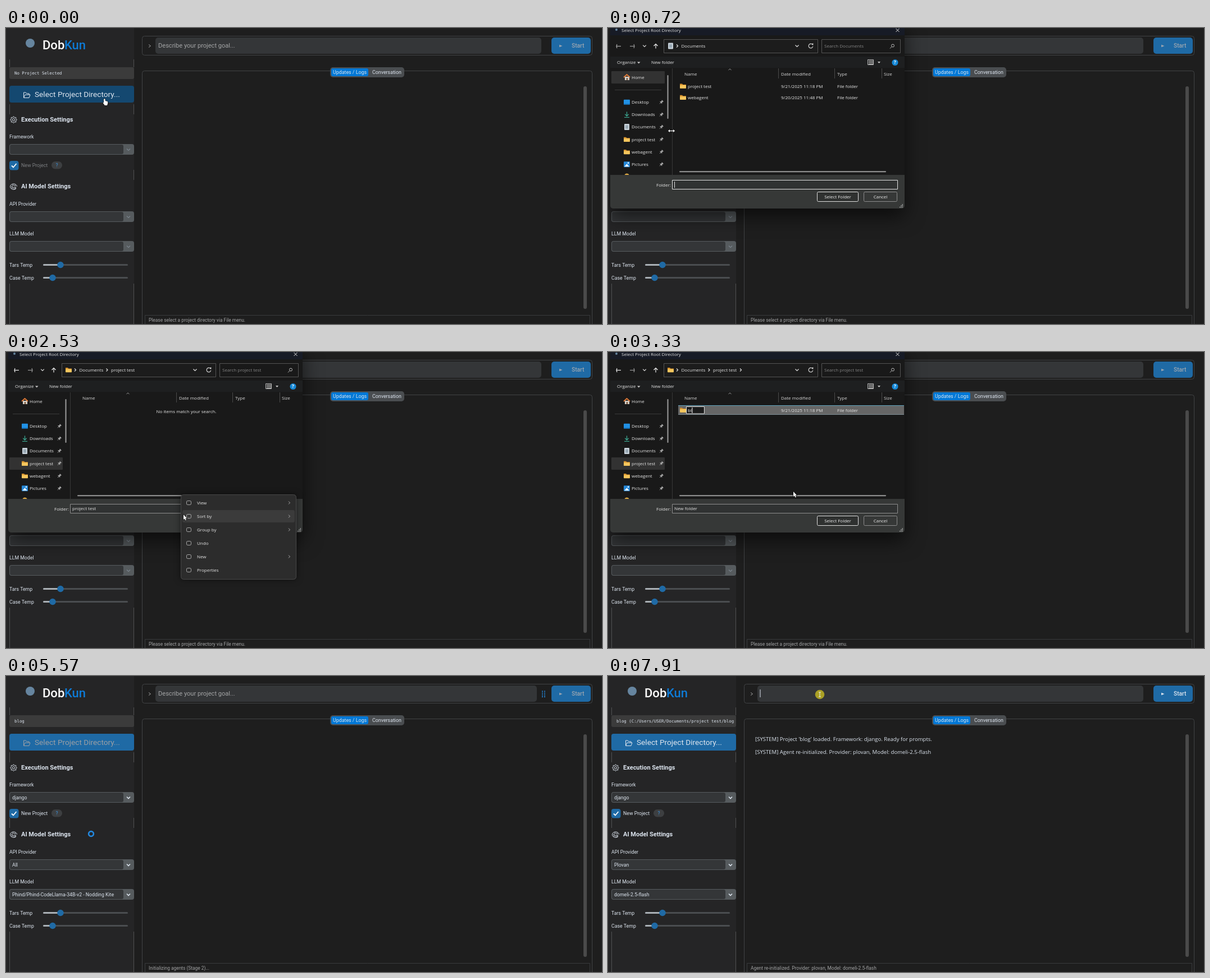
Write an HTML page with a canvas that moves like this. It is 1061 px wide and 528 px high and loops after 8 s.

```html
<!DOCTYPE html>
<html lang="en">
<head>
<meta charset="utf-8">
<title>Project setup</title>
<style>
html, body { margin: 0; width: 100%; height: 100%; overflow: hidden; background: #1e1e1e; }
canvas { display: block; }
</style>
</head>
<body>
<canvas id="stage" width="1061" height="528"></canvas>
<script>
const ctx = document.getElementById('stage').getContext('2d');
const LOOP = 8000;
const UI = 'Roboto, sans-serif', SYS = '"Open Sans", sans-serif', MONO = '"DejaVu Sans Mono", monospace';
const BLUE = '#1f6aa5', LIGHT = '#dce4ee', GREY = '#9a9a9a', YELLOW = '#e0ab45';
const MODELS = ['1.0-pro', '1.5-flash', '1.5-pro', '2.5-flash', '2.5-pro'].map(v => 'domeli-' + v);
const PROVIDERS = ['All', 'Nodding Kite', 'Plovan'];

// time, x, y, shape, click halo
const POINTER = [
  [0, 174, 126, 'hand'], [200, 0, 0, ''], [720, 113, 183.5, 'resize'],
  [860, 108, 188, 'resize'], [960, 92, 194, 'arrow'], [1060, 76, 199, 'arrow'],
  [1160, 72, 201, 'arrow', 1], [1270, 72, 201, 'arrow'], [1470, 90, 196, 'arrow'],
  [1570, 140, 184, 'arrow'], [1670, 208, 155.5, 'arrow'], [1820, 310, 254, 'arrow'],
  [2430, 316, 290, 'arrow'], [2540, 328, 330, 'arrow'], [2650, 345, 349, 'arrow'],
  [2750, 430, 349, 'arrow', 1], [2860, 484, 238, 'arrow'], [3080, 400, 244, 'arrow'],
  [3130, 330, 249, 'arrow'], [4180, 343, 262, 'arrow'], [4280, 372, 282, 'arrow'],
  [4380, 398, 296, 'arrow'], [4480, 409, 301, 'arrow'], [4580, 409, 301, 'arrow', 1],
  [4680, 409, 301, 'arrow'], [4980, 0, 0, ''], [5950, 250, 345, 'arrow'],
  [6040, 220, 335, 'arrow', 1], [6140, 215, 342, 'arrow'], [6230, 110, 372, 'arrow'],
  [6330, 62, 386, 'arrow'], [6430, 60, 387, 'arrow', 1], [6520, 120, 384, 'arrow'],
  [6620, 195, 382, 'arrow'], [6710, 220, 384.5, 'arrow', 1], [6910, 170, 415, 'arrow'],
  [7010, 84, 458, 'arrow'], [7120, 77, 457, 'arrow', 1], [7220, 76, 455, 'arrow'],
  [7420, 142, 402, 'arrow'], [7660, 230, 270, 'arrow'], [7740, 345, 90, 'arrow'],
  [7830, 377, 33, 'beam'], [7910, 377, 33, 'beam', 1]
];

function fill(x, y, w, h, color, r = 0) {
  ctx.fillStyle = color;
  ctx.beginPath();
  ctx.roundRect(x, y, w, h, r);
  ctx.fill();
}
function frame(x, y, w, h, color, r = 0) {
  ctx.strokeStyle = color;
  ctx.lineWidth = 1;
  ctx.beginPath();
  ctx.roundRect(x + .5, y + .5, w - 1, h - 1, r);
  ctx.stroke();
}
function path(points, color, width = 1, close = false) {
  ctx.beginPath();
  for (let i = 0; i < points.length; i += 2) ctx.lineTo(points[i], points[i + 1]);
  if (close) ctx.closePath();
  ctx.strokeStyle = color;
  ctx.lineWidth = width;
  ctx.stroke();
}
function poly(points, color) {
  ctx.beginPath();
  for (let i = 0; i < points.length; i += 2) ctx.lineTo(points[i], points[i + 1]);
  ctx.fillStyle = color;
  ctx.fill();
}
function dot(x, y, r, color) {
  ctx.fillStyle = color;
  ctx.beginPath();
  ctx.arc(x, y, r, 0, 7);
  ctx.fill();
}
function ring(x, y, r, color, width = 1) {
  ctx.strokeStyle = color;
  ctx.lineWidth = width;
  ctx.beginPath();
  ctx.arc(x, y, r, 0, 7);
  ctx.stroke();
}
// y is the middle of the capitals
function text(s, x, y, size, color, family = UI, weight = 400, align = 'left') {
  ctx.font = `${weight} ${size}px ${family}`;
  ctx.textAlign = align;
  ctx.fillStyle = color;
  ctx.fillText(s, x, y + size * .355);
}
const label = (s, x, y, color = LIGHT) => text(s, x, y, 8.75, color);
const sys = (s, x, y, color = '#e6e6e6', align) => text(s, x, y, 8, color, SYS, 400, align);
const chevron = (x, y, color, s = 3, w = 1.3) => path([x - s, y - s / 2, x, y + s / 2, x + s, y - s / 2], color, w);

function combo(y, value, ready) {
  fill(6, y, 222, 19, '#565b5e', 4);
  fill(7, y + 1, 202, 17, '#343638', 3);
  label(value, 11, y + 10);
  chevron(218, y + 10, ready ? LIGHT : '#7a848d', 3, ready ? 1.6 : 1.2);
}
function slider(name, y, x) {
  label(name, 6, y + .5);
  fill(66, y - 1.5, 151, 3, '#4a4d50', 1.5);
  fill(66, y - 1.5, x - 66, 3, '#aab0b5', 1.5);
  dot(x, y, 5.7, BLUE);
}
function gear(x, y) {
  ctx.save();
  ctx.translate(x, y);
  ring(0, 0, 2.1, LIGHT);
  ctx.beginPath();
  for (let i = 0; i <= 48; i++) {
    const a = i * Math.PI / 24, r = 5 + .9 * Math.cos(a * 8);
    ctx.lineTo(r * Math.cos(a), r * Math.sin(a));
  }
  ctx.stroke();
  ctx.restore();
}
function palette(x, y) {
  ctx.strokeStyle = LIGHT;
  ctx.lineWidth = 1;
  ctx.beginPath();
  ctx.ellipse(x, y, 6, 5, 0, .7, 6.2);
  ctx.stroke();
  [[-3, 0], [-1, -2.5], [2.5, -2]].forEach(p => ring(x + p[0], y + p[1], .9, LIGHT, .8));
  path([x - 4, y + 3, x, y + 1.5, x + 4, y + 1, x + 3, y + 4.5, x, y + 3.5], LIGHT);
}

function sidebar(t) {
  const opened = t >= 5570, loaded = t >= 5850, busy = opened && !loaded;
  fill(0, 0, 228, 528, '#252526');
  for (const [a, b] of [[56, 70], [136, 154], [253, 271], [456, 528]])
    for (const x of [6.5, 227.5]) path([x, a, x, b], '#505153');
  dot(43, 27, 8, '#66859f');
  text('Dob', 65, 30, 22, '#fff', UI, 500);
  text('Kun', 104, 30, 22, '#0e7bd6', UI, 500);

  fill(6, 70, 222, 21, '#3b3b3b', 3);
  const dir = loaded ? 'blog (C:/Users/USER/Documents/project test/blog' : opened ? 'blog' : 'No Project Selected';
  text(dir, 15, 80.5, 7.4, LIGHT, MONO);

  fill(6, 103, 222, 30, t < 100 ? '#144870' : BLUE, 4);
  const ink = busy ? '#9a9fa5' : LIGHT;
  path([31.5, 124, 31.5, 115, 35, 115, 37, 117, 41, 117, 41, 119], ink);
  path([31.5, 124.5, 34, 119, 43, 119, 41, 124.5], ink, 1, true);
  text('Select Project Directory...', 51, 118, 13.67, ink);

  gear(13.5, 163.7);
  text('Execution Settings', 27, 163.5, 11, LIGHT, UI, 700);
  label('Framework', 6, 194);
  combo(207, opened ? 'django' : '', opened);
  fill(6, 237, 16.5, 16.5, BLUE, 4);
  path([10, 245.5, 13, 248.5, 18.5, 242], '#fff', 1.8);
  label('New Project', 27, 245, opened ? LIGHT : '#7d7f82');
  fill(81, 238, 19, 13.5, '#3d3f41', 6.5);
  text('?', 90.5, 245, 8.5, '#3a8fd8', UI, 400, 'center');

  palette(13.5, 283);
  text('AI Model Settings', 27, 282, 11, LIGHT, UI, 700);
  if (busy) ring(151.5, 281.5, 4.4, '#2389e0', 2.6);
  label('API Provider', 6, 314);
  const chosen = t >= 6430;
  combo(327, !opened ? '' : chosen ? 'Plovan' : 'All', opened);
  label('LLM Model', 6, 366.5);
  const model = chosen ? MODELS[t >= 7120 ? 3 : 0] : 'Phind/Phind-CodeLlama-34B-v2 - Nodding Kite';
  combo(380, opened ? model : '', opened);
  slider('Tars Temp', 422.5, 97);
  slider('Case Temp', 445.5, 83);
}

function workspace(t) {
  const loaded = t >= 5850, busy = t >= 5570 && !loaded, again = t >= 7660;
  frame(242, 14, 802, 35, '#414345', 4);
  path([254, 29.5, 257.5, 32, 254, 34.5], '#a0a0a0');
  fill(266, 17, busy ? 679 : 687, 29, '#343638', 5);
  if (t < 7910) text('Describe your project goal...', 271, 31.5, 11.07, '#a4a5a6');
  else fill(270.5, 24, 1, 14, LIGHT);
  if (busy) for (let i = 0; i < 8; i++)
    fill(954 + i % 2 * 4, 26.5 + (i >> 1) * 3.2, 1.8, 1.8, '#2389e0');
  fill(971, 17, 70, 29, BLUE, 5);
  const ink = loaded ? LIGHT : '#9aa5b0';
  poly([985, 29.8, 990.5, 32, 985, 34.2], ink);
  text('Start', 1007, 31.5, 10.2, ink, UI, 500);

  frame(242, 76, 802, 470, '#414345', 4);
  fill(577, 70, 132, 18, '#4a4d50', 5);
  fill(579, 72, 66, 14, '#0078d7', 3);
  text('Updates / Logs', 582, 79, 8.85, LIGHT);
  text('Conversation', 652, 79, 8.85, LIGHT);
  fill(1028, 104, 6, 397, '#4a4a4a', 3);

  const log = (s, y) => text('[SYSTEM] ' + s, 262, y, 9.55, LIGHT, SYS);
  const first = "Project 'blog' loaded. Framework: django. Ready for prompts.";
  const second = 'Agent re-initialized. Provider: plovan, Model: ' + MODELS[3];
  if (loaded) log(first, 113);
  if (again) log(second, 136);

  path([247.5, 528, 247.5, 512.5, 1039.5, 512.5, 1039.5, 528], '#393b3d');
  const status = again ? second : loaded ? first : busy ? 'Initializing agents (Stage 2)...' : 'Please select a project directory via File menu.';
  text(status, 254, 521, 8.4, '#a2a3a4');
}

function folder(x, y) {
  poly([x, y - 4, x + 4, y - 4, x + 5.5, y - 2.5, x + 11, y - 2.5, x + 11, y + 4, x, y + 4], '#d9942e');
  fill(x, y - 1.5, 11, 5.8, '#f5c65d', 1);
}
function paper(x, y) {
  fill(x + 1, y - 5.5, 9, 11, '#c6d0d8', 1);
  for (let i = -2; i < 4; i += 2) path([x + 3, y + i, x + 8, y + i], '#6d8291');
}
const icons = {
  Home(x, y) {
    fill(x + 2, y - 1, 8, 6, '#d8d4cd');
    path([x, y, x + 5.5, y - 5, x + 11, y], '#e07b39', 2);
    fill(x + 4.5, y + 1, 3, 4, '#8a6a50');
  },
  Desktop(x, y) { fill(x, y - 4.5, 11, 9, '#2191e5', 1); fill(x, y + 3, 11, 1.5, '#126bb0'); },
  Downloads(x, y) {
    path([x + 5.5, y - 5, x + 5.5, y + 2], '#3ba58f', 1.3);
    chevron(x + 5.5, y + 1, '#3ba58f', 3.2);
    path([x + 1, y + 5, x + 10, y + 5], '#3ba58f', 1.2);
  },
  Documents: paper, 'project test': folder, webagent: folder,
  Pictures(x, y) {
    fill(x, y - 5, 11, 10, '#2588d8', 1);
    poly([x + 1, y + 4, x + 5.5, y - 1, x + 10, y + 4], '#e8f4fd');
    dot(x + 8, y - 2.5, 1.2, '#fff');
  }
};
function pin(x, y) {
  path([x - 3, y + 3, x - 1, y + 1], '#a8a8a8');
  poly([x - 3, y - 1, x, y - 1.5, x + 1, y - 4, x + 4, y - 1, x + 1.5, y, x + 1, y + 3], '#a8a8a8');
}

function places(t) {
  const inside = t >= 1270;
  fill(6, inside ? 188 : 77, 95, 22, '#323232', 1);
  if (t >= 1060 && !inside) fill(6, 188, 95, 22, '#2a2a2a', 1);
  Object.keys(icons).forEach((name, i) => {
    const y = i ? 110 + i * 22.2 : 88;
    icons[name](28, y);
    sys(name, 42, y);
    if (i) pin(95, y);
  });
  path([12, 110.5, 95, 110.5], '#3a3a3a');
  ctx.fillStyle = YELLOW;
  ctx.beginPath();
  ctx.arc(33.5, 264, 4.5, Math.PI * 1.15, Math.PI * 1.85);
  ctx.fill();
  fill(105.5, 84, 2, 78, '#9d9d9d', 1);
  path([114.5, 72, 114.5, 262], '#383838');
}

function listing(t) {
  ['Name', 'Date modified', 'Type', 'Size'].forEach((s, i) => sys(s, [136, 308, 408, 491][i], 82, '#d8d8d8'));
  for (const x of [303.5, 403.5, 487.5]) path([x, 72, x, 90], '#4a4a4a');
  chevron(217, 74, '#999', -2.5, 1);
  fill(127, 255.2, 368, 2, '#9a9a9a', 1);
  const row = (name, y, date) => {
    folder(128, y - .5);
    if (name) sys(name, 142, y);
    sys(date, 308, y);
    sys('File folder', 408, y);
  };
  if (t < 1370) {
    row('project test', 104, '9/21/2025 11:18 PM');
    row('webagent', 124.3, '9/20/2025 11:48 PM');
  } else if (t < 2860) {
    sys('No items match your search.', 321, 106.5, '#e6e6e6', 'center');
  } else {
    const done = t >= 4040;
    fill(125, 95, 402, 17, '#666');
    path([125, 95.5, 527, 95.5], '#5fa3bd');
    path([125, 111.5, 527, 111.5], '#7d8d94');
    row(done ? 'blog' : '', 104, '9/21/2025 11:18 PM');
    if (!done) rename(t);
  }
}
function rename(t) {
  const typed = 'blog'.slice(0, t < 3080 ? 0 : t < 3330 ? 1 : t < 3540 ? 2 : t < 3740 ? 3 : 4);
  const name = typed || 'New folder';
  ctx.font = '8px ' + SYS;
  const w = ctx.measureText(name).width;
  const box = typed ? w + 26 : w + 8;
  fill(139, 97, box, 13.5, '#1b1b1b');
  frame(139, 97, box, 13.5, '#e8e8e8');
  if (!typed) fill(141, 98.5, w + 2, 10.5, '#0078d7');
  sys(name, 142, 104, '#fff');
  if (typed) fill(142.5 + w, 99, 1, 10, '#fff');
}

function dialog(t) {
  const inside = t >= 1370;
  ctx.save();
  ctx.shadowColor = 'rgba(0,0,0,.6)';
  ctx.shadowBlur = 34;
  ctx.shadowOffsetY = 14;
  fill(4, -12, 524, 334, '#191919', 5);
  ctx.restore();
  fill(4, -12, 524, 25, '#171b26');
  dot(15, 3, 2, '#66859f');
  sys('Select Project Root Directory', 24, 4.5);
  path([512.5, 1, 518.5, 7], '#ddd');
  path([518.5, 1, 512.5, 7], '#ddd');

  const arrow = (x, dx, color) => {
    path([x - 4, 32.5, x + 4, 32.5], color, 1.2);
    path([x + dx, 29, x + dx * 4 / 3, 32.5, x + dx, 36], color, 1.2);
  };
  arrow(19, -3, inside ? '#eee' : '#aaa');
  arrow(43, 3, '#999');
  chevron(65, 32, '#ddd', 2.8, 1.2);
  path([85, 36.5, 85, 28.5], '#eee', 1.2);
  path([81.5, 32, 85, 28.5, 88.5, 32], '#eee', 1.2);
  fill(99, 20, 275, 25, '#1c1c1c');
  frame(99, 20, 275, 25, '#545454');
  const step = x => path([x, 29.5, x + 2.5, 32, x, 34.5], '#ddd', 1.2);
  (inside ? folder : paper)(106, 32);
  step(122);
  sys('Documents', 130.5, 32);
  if (inside) { step(178.5); sys('project test', 187, 32); }
  if (t >= 3080) step(235);
  chevron(336.5, 32, '#ddd', 3, 1.2);
  ctx.beginPath();
  ctx.arc(361, 32, 3.8, .2, 5.5);
  ctx.strokeStyle = '#ddd';
  ctx.stroke();
  poly([362, 28, 365.5, 27.5, 365, 31], '#ddd');
  frame(380, 20, 141, 25, '#545454');
  sys('Search ' + (inside ? 'project test' : 'Documents'), 385, 32.5, '#858585');
  ring(507, 31.5, 2.5, '#bbb');
  path([505, 33.5, 502, 36.5], '#bbb');

  fill(4, 51, 524, 20, '#1e1f20');
  sys('Organize', 16, 61.5);
  poly([52, 60.5, 57.5, 60.5, 54.7, 63.5], '#ccc');
  sys('New folder', 77, 61.5);
  frame(462, 56, 11, 10, '#bbb');
  for (let y = 58.5; y < 65; y += 2) path([464, y, 472, y], '#bbb');
  poly([480, 60, 485, 60, 482.5, 63], '#ccc');
  dot(511, 61.5, 5.5, '#1689d8');
  text('?', 511, 61.5, 8, '#fff', SYS, 700, 'center');

  places(t);
  listing(t);

  fill(4, 262, 524, 60, '#363837', [0, 0, 5, 5]);
  sys('Folder:', 86, 280);
  fill(114, 271, 402, 17, '#303232');
  frame(114, 271, 402, 17, inside ? '#8e8e8e' : '#e2e2e2');
  const target = t >= 4040 ? 'blog' : t >= 2860 ? 'New folder' : inside ? 'project test' : '';
  if (target) sys(target, 118, 279);
  else fill(118, 274, 1, 11, '#ddd');
  fill(372, 292, 74, 18, '#2f3130', 2);
  frame(372, 292, 74, 18, '#dedede', 2);
  sys('Select Folder', 409, 301, '#eee', 'center');
  frame(455, 292, 60, 18, '#8c8c8c', 2);
  sys('Cancel', 485, 301, '#eee', 'center');
  for (let i = 0; i < 3; i++)
    for (let j = 0; j <= i; j++) fill(523.5 - j * 2.3, 314.3 + i * 2.3, 1.4, 1.4, '#bbb');
}

function contextMenu(t) {
  ctx.save();
  ctx.globalAlpha = t < 2430 ? .35 : 1;
  ctx.shadowColor = 'rgba(0,0,0,.5)';
  ctx.shadowBlur = 12;
  fill(311, 254, 206, 152, '#2c2c2c', 5);
  ctx.shadowColor = 'transparent';
  frame(311, 254, 206, 152, '#474747', 5);
  const hot = t < 2430 ? -1 : t < 2540 ? 1 : t < 2650 ? 3 : 4;
  if (hot >= 0) fill(314, 258 + hot * 24, 200, 22, '#3b3b3b', 3);
  ['View', 'Sort by', 'Group by', 'Undo', 'New', 'Properties'].forEach((s, i) => {
    const y = 269 + i * 24;
    sys(s, 340, y);
    frame(321, y - 4, 9, 8, '#aaa', 2);
    if (i < 3 || i === 4) path([503, y - 2.5, 505.5, y, 503, y + 2.5], '#aaa');
  });
  ctx.restore();
}
function dropdown(items, y, alpha, hot) {
  const h = items.length * 17.2 + 2;
  ctx.save();
  ctx.globalAlpha = alpha;
  fill(6.5, y, 99, h, '#2b2b2b');
  if (hot >= 0) fill(8, y + 1 + hot * 17.2, 96, 17, '#454545');
  items.forEach((s, i) => label(s, 20, y + 9.5 + i * 17.2));
  ctx.globalAlpha = Math.min(1, alpha * 2);
  frame(6, y, 100, h, '#8a8a8a');
  ctx.restore();
}

function pointer(t) {
  const [, x, y, shape, halo] = POINTER.findLast(p => p[0] <= t);
  if (halo) dot(x, y, 8.3, '#aaa025');
  if (shape === 'arrow') {
    const p = [0, 0, 0, 9, 2, 7.2, 3.6, 10.5, 5, 9.8, 3.5, 6.7, 6, 6.5].map((v, i) => v + (i % 2 ? y : x));
    path(p, '#111', 1.4, true);
    poly(p, '#fff');
  } else if (shape === 'hand') {
    const p = [0, 1, 1.6, 0, 2.6, 1, 2.8, 4, 7, 5, 7.2, 8.5, 6, 12, 1.8, 12, -1.5, 7.5, 0, 7].map((v, i) => v + (i % 2 ? y : x));
    path(p, '#111', 1.2, true);
    poly(p, '#fff');
  } else if (shape === 'resize') {
    path([x - 5, y, x + 5, y], '#fff', 1.2);
    for (const d of [-1, 1]) poly([x + d * 6, y, x + d * 3, y - 2.6, x + d * 3, y + 2.6], '#fff');
  } else if (shape === 'beam') {
    path([x, y - 4, x, y + 4], '#eee');
    for (const d of [-4, 4]) path([x - 2, y + d, x + 2, y + d], '#eee');
  }
}

function draw(t) {
  ctx.globalAlpha = 1;
  fill(0, 0, 1061, 528, '#1e1e1e');
  sidebar(t);
  workspace(t);
  if (t >= 200 && t < 4780) {
    ctx.save();
    if (t < 720) {
      ctx.globalAlpha = .2;
      ctx.translate(266, 156);
      ctx.scale(.86, .86);
      ctx.translate(-266, -156);
    } else if (t >= 4680) ctx.globalAlpha = .35;
    dialog(t);
    ctx.restore();
  }
  if (t >= 2270 && t < 2860) contextMenu(t);
  if (t >= 6140 && t < 6520) dropdown(PROVIDERS, 349, t < 6230 ? .3 : 1, t < 6330 ? -1 : 2);
  if (t >= 6810 && t < 7220) dropdown(MODELS, 402, t < 6910 ? .3 : 1, t < 7010 ? -1 : 3);
  pointer(t);
}

const start = performance.now();
function tick(now) {
  draw(Math.max(0, now - start) % LOOP);
  requestAnimationFrame(tick);
}
draw(0);
requestAnimationFrame(tick);
</script>
</body>
</html>
```
